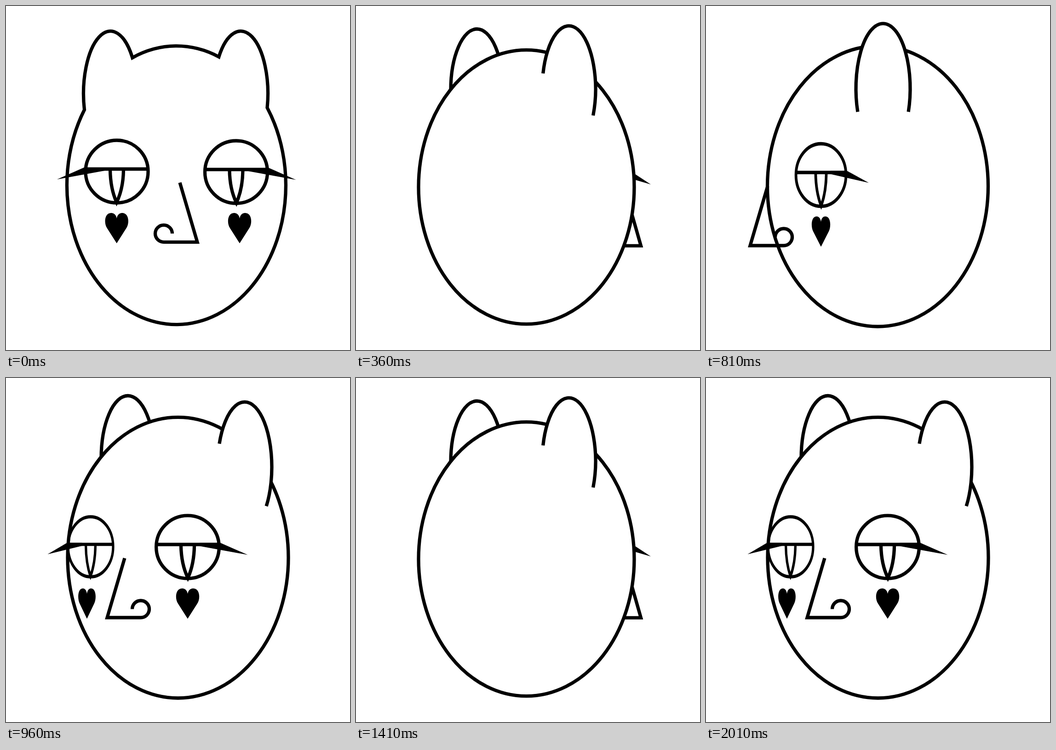
An HTML page that plays this animation: 748 px wide and 748 px high, repeating every 2.16 s.

```html
<!DOCTYPE html>
<html lang="en">
<head>
<meta charset="utf-8">
<title>Turning cat head</title>
<style>
  html, body { margin: 0; width: 100%; height: 100%; overflow: hidden; background: #fff; }
  svg { display: block; width: 100%; height: 100%; fill: #fff; stroke: #000; stroke-width: 7.3; stroke-miterlimit: 8; }
  .line { fill: none; }
  .ink { fill: #000; stroke: none; }

  /* The front view opens the loop, then the seven other views run twice. */
  .front, .view { visibility: hidden; animation: 2160ms step-end infinite; }
  .front { animation-name: open; }
  .view { animation-name: turn; animation-delay: calc(-2100ms + var(--i) * 150ms); }
  @keyframes open {
    0% { visibility: visible; }
    2.7778%, 100% { visibility: hidden; }
  }
  @keyframes turn {
    0%, 48.6111% { visibility: visible; }
    6.9444%, 55.5556%, 100% { visibility: hidden; }
  }
</style>
</head>
<body>
<svg viewBox="0 0 748 748">
  <defs>
    <g id="eye">
      <circle class="line" r="68"/>
      <path class="line" d="M-68 -5.5H68M-14.5 -4Q-14 37 -.5 67Q14 37 14.5 -4"/>
      <path class="ink" d="M-130 17L-71 -9H-26V-2Z"/>
    </g>
    <path id="heart" class="ink" d="M0 66L-21 33C-28 23 -27 0 -12 0C-5 0 -1 5 0 12C1 5 5 0 12 0C27 0 28 23 21 33Z"/>
    <path id="nose" class="line" d="M378 384L416 513.3H343A18.5 18.5 0 1 1 361.5 494.8"/>
    <path id="shell" d="M274.9 112.5A238 302.7 0 0 1 462.8 110.6A59 136 0 0 1 568 221.1A238 302.7 0 1 1 170.5 225.7A58.5 136 0 0 1 274.9 112.5Z"/>

    <g id="quarter">
      <ellipse cx="265" cy="174.5" rx="58" ry="136"/>
      <ellipse cx="374" cy="390.7" rx="240" ry="305.3"/>
      <path d="M463.9 142.8A59 141.5 0 1 1 566.1 278.7"/>
      <use href="#eye" transform="translate(184 367) scale(.72 .96)"/>
      <use href="#eye" transform="translate(395 367.5) scale(-1.005 1.005)"/>
      <use href="#heart" transform="translate(176 457.5) scale(.75 1)"/>
      <use href="#heart" x="395" y="457.5"/>
      <use href="#nose" transform="translate(636 7.7) scale(-1 1)"/>
    </g>

    <g id="side">
      <ellipse cx="373.5" cy="392" rx="240" ry="305"/>
      <path d="M329.9 230.2A59 141.5 0 1 1 440.1 230.2"/>
      <use href="#eye" transform="translate(250 367.5) scale(-.8 1)"/>
      <use href="#heart" transform="translate(250 457.5) scale(.8 1)"/>
      <use href="#nose" transform="translate(512 7.7) scale(-1 1)"/>
    </g>

    <g id="rear">
      <ellipse cx="263" cy="183" rx="57" ry="133"/>
      <path class="ink" d="M600 361L641 388L600 376Z"/>
      <path class="line" d="M598 446L619.5 521.3H575"/>
      <ellipse cx="370.5" cy="393.7" rx="234.5" ry="298"/>
      <path d="M406.7 146.7A58 137.5 0 1 1 515.6 238.1"/>
    </g>
  </defs>

  <g class="front">
    <use href="#shell"/>
    <use href="#eye" x="241" y="360"/>
    <use href="#eye" transform="translate(500.5 361) scale(-1 1)"/>
    <use href="#heart" x="240.7" y="450"/>
    <use href="#heart" x="508" y="450"/>
    <use href="#nose"/>
  </g>
  <g class="view" style="--i:0"><use href="#quarter" transform="translate(738.3 10.7) scale(-.981 .981)"/></g>
  <g class="view" style="--i:1"><use href="#side" transform="translate(741.1 4.4) scale(-.99 .987)"/></g>
  <g class="view" style="--i:2"><use href="#rear"/></g>
  <g class="view" style="--i:3"><use href="#shell" transform="translate(-7.5 -11.2) scale(1.019)"/></g>
  <g class="view" style="--i:4"><use href="#rear" transform="translate(742 -1) scale(-1.003 1.003)"/></g>
  <g class="view" style="--i:5"><use href="#side"/></g>
  <g class="view" style="--i:6"><use href="#quarter"/></g>
</svg>
</body>
</html>
```
